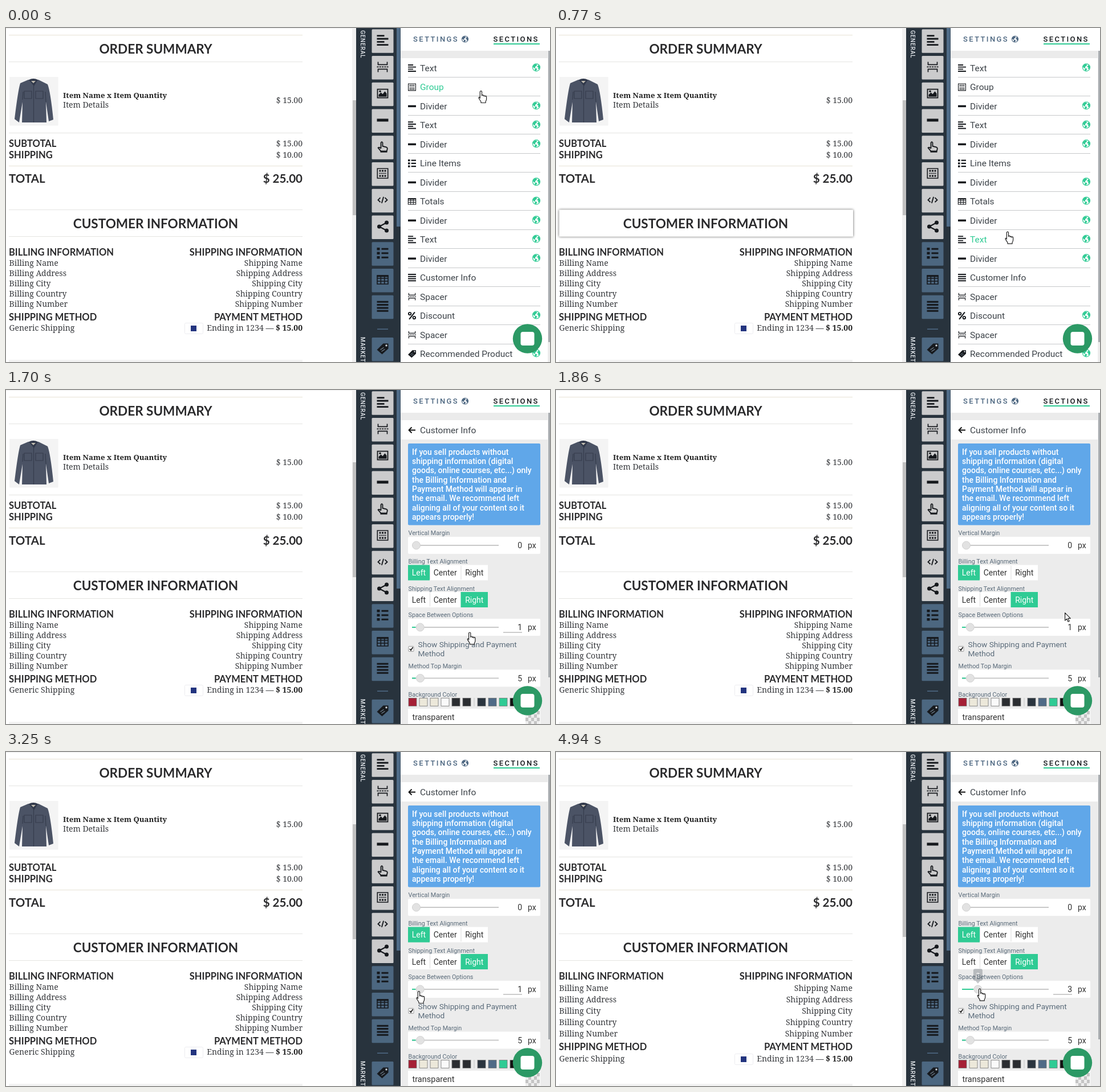
An HTML page that plays this animation: 954 px wide and 587 px high, repeating every 5030 ms.

```html
<!DOCTYPE html>
<html lang="en">
<head>
<meta charset="utf-8">
<title>Receipt editor</title>
<style>
html, body { margin: 0; width: 100%; height: 100%; overflow: hidden; background: #fff; }
svg { display: block; }
text { white-space: pre; }
.ui { font-family: Roboto, sans-serif; }
.head { font-family: Lato, sans-serif; font-weight: 700; fill: #2a2a2c; }
.body { font-family: "Noto Serif", serif; font-size: 14px; fill: #35373b; }
.bold { font-weight: 700; fill: #222; }
#hover { filter: drop-shadow(0 0 2px #555); }
</style>
</head>
<body>
<svg id="stage" width="954" height="587" viewBox="0 0 954 587"></svg>
<script>
const LOOP = 5030, STEP = LOOP / 65;
const GREEN = '#2fcb94', SLATE = '#4c6680', NAVY = '#28333d', INK = '#16191d';

const rect = (x, y, w, h, fill, extra = '') =>
  `<rect x="${x}" y="${y}" width="${w}" height="${h}" fill="${fill}" ${extra}/>`;
const text = (x, y, str, cls, extra = '') =>
  `<text x="${x}" y="${y}" class="${cls}" ${extra}>${str}</text>`;
const ui = (x, y, str, size, fill, extra = '') =>
  text(x, y, str, 'ui', `font-size="${size}" fill="${fill}" ${extra}`);
const path = (d, fill = 'currentColor', extra = '') => `<path d="${d}" fill="${fill}" ${extra}/>`;
const line = (d, width) => path(d, 'none', `stroke="currentColor" stroke-width="${width}"`);
const END = 'text-anchor="end"', MID = 'text-anchor="middle"';

// Icons live in a 20 by 20 box around the origin.
const icons = {
  text: line('M-10-8H3M-10-2.7H10M-10 2.7H3M-10 8H10', 2.8),
  spacer: line('M-8-9V-4H8V-9M-8 9V4H8V9', 1.7) + line('M-10 0H10', 1.7).replace('/>', ' stroke-dasharray="3 1.3"/>'),
  image: line('M-9-7.5H9V7.5H-9Z', 1.8) + path('M-7 5.5V2l4-4 3 3 4-5 3 4v5.5z') + '<circle cx="-4.5" cy="-4" r="1.8" fill="currentColor"/>',
  divider: path('M-10-2.5H10V2.5H-10Z'),
  button: line('M-3 3V-7q1.5-3 3 0V-1L7 1Q9 2 8 5L7 8H-3L-8 2Q-7 0-3 3', 1.8) + path('M-4 7H8V10H-4Z'),
  group: line('M-9.2-8.5H9.2V8.5H-9.2Z', 1.6) + line('M-6-4.5H6M-6 4.5H6', 3).replace('/>', ' stroke-dasharray="3 1.5"/>') + line('M-6 0H6', 2).replace('/>', ' stroke-dasharray="1.6 1"/>'),
  code: line('M-4-4L-8 0-4 4M4-4L8 0 4 4M1.6-5.5L-1.6 5.5', 1.9),
  share: line('M7-7L-6 0 7 7', 2.2) + [[7, -7], [-6, 0], [7, 7]].map(([x, y]) => `<circle cx="${x}" cy="${y}" r="3.5" fill="currentColor"/>`).join(''),
  items: line('M-10-7.5H-5M-10 0H-5M-10 7.5H-5', 4.5) + line('M-2-7.5H10M-2 0H10M-2 7.5H10', 3),
  totals: line('M-9.5-7.5H9.5V7.5H-9.5ZM-9.5-2.5H9.5M-9.5 2.5H9.5M-3.2-7.5V7.5M3.2-7.5V7.5', 1.6) + path('M-10-8H10V-5H-10Z'),
  info: line('M-10-8H10M-10-2.7H10M-10 2.7H10M-10 8H10', 3),
  discount: line('M7-9L-7 9', 3) + '<g fill="none" stroke="currentColor" stroke-width="2.8"><circle cx="-5.5" cy="-5" r="3.2"/><circle cx="5.5" cy="5" r="3.2"/></g>',
  product: path('M-10 2L1-9H10V0L-1 10Z') + '<circle cx="6.5" cy="-5.5" r="1.7" fill="#cdd3d8"/>' + path('M-4 2L2-2M-2 5L4 1', 'none', 'stroke="#71808d" stroke-width="1.4"'),
  globe: line('M-9 0A9 9 0 1 0 9 0A9 9 0 1 0-9 0', 1.7) + path('M-8-4L-3-8 2-7 0-3-3-2-2 1-5 2-8-1ZM-3 2L2 3 1 6-2 9-4 6ZM3-4L6-6 9-1 7 5 4 3 5 0 2-1Z'),
};
const icon = (name, x, y, scale = 1, color = INK) =>
  `<g transform="translate(${x} ${y}) scale(${scale})" color="${color}">${icons[name]}</g>`;

const rows = [
  ['text', 'Text', 1], ['group', 'Group', 0], ['divider', 'Divider', 1], ['text', 'Text', 1],
  ['divider', 'Divider', 1], ['items', 'Line Items', 0], ['divider', 'Divider', 1], ['totals', 'Totals', 1],
  ['divider', 'Divider', 1], ['text', 'Text', 1], ['divider', 'Divider', 1], ['info', 'Customer Info', 0],
  ['spacer', 'Spacer', 0], ['discount', 'Discount', 1], ['spacer', 'Spacer', 0], ['product', 'Recommended Product', 1],
];
const ROW = 33.47, ROW_TOP = 53;
// Receipt area lit by each row: top and height.
const areas = { 2: [11.5, 1], 3: [12, 47], 4: [59, 1], 5: [60, 124], 6: [184, 1], 7: [194, 100], 8: [319, 1], 9: [319.5, 47], 10: [366, 1], 11: [383.5, 157] };

function shirt() {
  return rect(6, 86, 85.5, 85.5, '#f4f4f4') +
    path('M39 91L25 97Q21 110 15 160L23 166 29 130 28 166H71L70 130 75 164 83 161Q78 112 73 99L57 91Z', '#4b5365') +
    path('M29 126L30 112M70 130L69 112M48.5 101V166M32 111H45V124H32ZM52 111H65V124H52Z', 'none', 'stroke="#363d4d" stroke-width="1.2"') +
    path('M40 91Q48 87 56 91L49 102Z', '#30384a') + path('M44 93H52L48 97Z', '#c2bdb0');
}

function receipt() {
  const rules = [12, 59, 184, 242, 319, 366].map((y, i) => rect(5, y, 515, 1, i === 0 || i === 3 ? '#e7e2d5' : '#e4e4e2')).join('');
  const head = (x, y, s, size, extra = '') => text(x, y, s, 'head', `font-size="${size}" ${extra}`);
  const right = (y, s) => text(520, y, s, 'body', END);
  const fields = ['Name', 'Address', 'City', 'Country', 'Number'].map((f, k) =>
    `<g data-rank="${k + 1}">${text(5.5, 417.5 + 18 * k, 'Billing ' + f, 'body')}${right(417.5 + 18 * k, 'Shipping ' + f)}</g>`).join('');
  return rect(0, 0, 607, 1, '#efefef') + '<rect id="hover" x="5.5" width="515.5" fill="#fff"/>' + rules +
    rect(5, 583, 515, 4, '#f3f3f3') +
    head(262.5, 45, 'ORDER SUMMARY', 22.5, MID) + shirt() +
    text(100, 123, 'Item Name x Item Quantity', 'body bold', 'style="font-size:13.2px"') +
    text(100, 140, 'Item Details', 'body') + right(131.5, '$ 15.00') +
    head(5, 209, 'SUBTOTAL', 16.5) + right(208, '$ 15.00') +
    head(5, 228.7, 'SHIPPING', 16.5) + right(227.5, '$ 10.00') +
    head(5, 271.7, 'TOTAL', 20.5) + head(520, 271.7, '$ 25.00', 20.5, END) +
    head(262.5, 352, 'CUSTOMER INFORMATION', 22.5, MID) +
    head(5, 399.5, 'BILLING INFORMATION', 16.5) + head(520, 399.5, 'SHIPPING INFORMATION', 16.5, END) + fields +
    `<g data-rank="5">${head(5, 513.7, 'SHIPPING METHOD', 16.5)}${head(520, 513.7, 'PAYMENT METHOD', 16.5, END)}</g>` +
    `<g data-rank="6">${text(5.5, 532, 'Generic Shipping', 'body')}` +
    rect(313.5, 518.5, 32, 19, '#fff', 'rx="2" stroke="#ececf0"') + rect(324, 523, 10, 10, '#23347f') +
    `<text x="520" y="532" class="body" ${END}>Ending in 1234 — <tspan class="bold">$ 15.00</tspan></text></g>` +
    rect(607, 0, 7.5, 587, '#f1f1f1') + '<rect id="pageThumb" x="608" y="127" width="6" fill="#c1c1c1"/>';
}

function toolbar() {
  const tools = ['text', 'spacer', 'image', 'divider', 'button', 'group', 'code', 'share', 'items', 'totals', 'info'];
  const button = (name, y, blue) => rect(641.5, y - 20.5, 38, 41.5, blue ? '#4c6780' : '#cbcbcc', 'rx="1.5"') + icon(name, 660.5, y - 1);
  const label = (y, s) => ui(0, 0, s, 10, '#e6eaee', `font-weight="500" letter-spacing=".8" transform="translate(622 ${y}) rotate(90)"`);
  return rect(614, 0, 78, 587, NAVY) + rect(685, 0, 6.5, 349, '#506c88') +
    label(4, 'GENERAL') + label(543, 'MARKETING') +
    tools.map((n, i) => button(n, 22.7 + 46.75 * i, i > 7)).join('') +
    rect(651, 528.5, 19, 1.5, '#506c88') + button('product', 564.5, true);
}

function sectionList() {
  return rect(692, 53, 258, 534, '#fff') + rows.map(([name, label, globe], i) => {
    const y = 70 + ROW * i;
    return icon(name, 712, y + .5, .7) + ui(726, y + 6, label, 15.5, '#3c4248', 'data-row') +
      (globe ? icon('globe', 930, y - .7, .72, GREEN) : '') + rect(705, Math.round(y + 16), 232, 1, '#c6c8ca');
  }).join('');
}

function slider(y, label, value, x, id = '') {
  const tag = s => id ? `id="${id}${s}"` : '';
  return ui(705.5, y - 18, label, 10.8, '#596a79') + rect(705, y - 15, 232, 30, '#fff', 'rx="2"') +
    rect(712, y - 1, 152, 2, '#c9c9c9') + rect(712, y - 1, Math.max(0, x - 720), 2, GREEN, tag('Fill')) +
    `<circle ${tag('Knob')} cx="${x}" cy="${y}" r="7" fill="#e2e2e2" stroke="#d2d2d2"/>` +
    ui(905, y + 5, value, 14, '#333', `${END} ${tag('Value')}`) + ui(915, y + 5, 'px', 14, '#333');
}

function alignment(y, label, active) {
  const cells = [['Left', 705, 38], ['Center', 743, 54.5], ['Right', 797.5, 47.5]];
  return ui(705.5, y - 16, label, 10.8, '#596a79') + cells.map(([s, x, w], i) => {
    const on = s === active;
    return rect(x, y - 13.5, w, 27, on ? GREEN : '#fff') + (i && !on ? rect(x, y - 12, 1, 24, '#ddd') : '') +
      ui(x + w / 2, y + 5, s, 14, on ? '#fff' : '#333', MID);
  }).join('');
}

function editor() {
  const note = ['If you sell products without', 'shipping information (digital', 'goods, online courses, etc...) only', 'the Billing Information and',
    'Payment Method will appear in', 'the email. We recommend left', 'aligning all of your content so it', 'appears properly!'];
  const swatches = ['#a51f35', '#ece8da', '#ece8da', '#fafafa', '#2b2d31', '#2b2d31', '#2a343e', '#4f6a86', GREEN, '#111'];
  let checker = '';
  for (let i = 0; i < 20; i++) checker += rect(911 + (i % 5) * 5, 564 + Math.floor(i / 5) * 6, 5, 6, (i + Math.floor(i / 5) * 0) % 2 ? '#eee' : '#c4c4c4');
  return rect(692, 53, 258, 534, '#ececec') + rect(692, 53, 258, 34, '#fff') +
    path('M718 70.5H707M711.5 65.5L706.5 70.5 711.5 75.5', 'none', 'stroke="#111" stroke-width="1.8"') +
    ui(726, 76, 'Customer Info', 15.5, '#3c4248') + rect(705, 94, 232, 143.5, '#60a7e9', 'rx="2"') +
    note.map((s, i) => ui(712, 113.5 + 16.35 * i, s, 14, '#fff', 'font-weight="500"')).join('') +
    slider(273, 'Vertical Margin', 0, 719.5) +
    alignment(321, 'Billing Text Alignment', 'Left') + alignment(368.5, 'Shipping Text Alignment', 'Right') +
    slider(417, 'Space Between Options', 1, 726.3, 'gap') + rect(872, 425.5, 33, 1, '#999', 'id="underline"') +
    rect(706, 450.5, 9, 9, '#fff', 'stroke="#999" rx="1"') + path('M708 455L710 457.5 713.5 452', 'none', 'stroke="#222" stroke-width="1.8"') +
    ui(722.5, 452, 'Show Shipping and Payment', 13.7, '#596a79') + ui(722.5, 468, 'Method', 13.7, '#596a79') +
    slider(506.5, 'Method Top Margin', 5, 726.5) + ui(705.5, 538.5, 'Background Color', 10.8, '#596a79') +
    swatches.map((c, i) => rect(706 + 19 * i + (i > 5 ? 7 : 0), 541.5, 14, 14, c, 'stroke="#777" stroke-width=".8"')).join('') +
    rect(820.5, 541, 1, 15, '#c4c4c4') + rect(705, 560, 232, 27, '#fff') + ui(712.5, 580, 'transparent', 14.5, '#333') + checker +
    `<g id="tip">${rect(-8, 381, 16, 21, NAVY, 'rx="3"')}${path('M-5 401H5L0 407Z', NAVY)}` +
    ui(0, 396, 1, 11, '#fff', `font-weight="700" id="tipValue" ${MID}`) + '</g>';
}

function panel() {
  const tab = (x, s, fill) => ui(x, 24, s, 13, fill, 'font-weight="500" letter-spacing="2.4"');
  return rect(692, 0, 262, 587, '#fff') + rect(692, 40, 262, 13, '#ebebeb') + rect(950, 40, 4, 547, '#ececec') +
    tab(714, 'SETTINGS', SLATE) + icon('globe', 805, 19.5, .62, SLATE) + tab(854.5, 'SECTIONS', INK) + rect(855, 27, 81, 2, GREEN) +
    `<g id="list">${sectionList()}</g><g id="editor">${editor()}</g>` +
    '<rect id="panelThumb" x="951" y="40" width="3" fill="#a9adb1"/>' +
    '<circle cx="914.5" cy="546" r="25.7" fill="#2c9965"/>' + rect(902.5, 534, 24, 24, '#fff', 'rx="4"');
}

const outline = 'stroke="#222" stroke-width="1.2" stroke-linejoin="round"';
const cursors =
  path('M-1.7 12.5V1.2a1.6 1.6 0 0 1 3.2 0V8a1.4 1.4 0 0 1 2.8 0v.8a1.4 1.4 0 0 1 2.7 0v.8a1.3 1.3 0 0 1 2.6 0V14q0 2.5-1.5 4v2.5H0v-2L-3.6 13q-1-2 .4-2.3 1-.1 1.5 1.8z', '#fff', outline + ' id="hand"') +
  path('M0 0V13.5L3.2 10.6 5.4 15.6 7.6 14.6 5.4 9.8H9.6Z', '#fff', outline + ' id="arrow"');

const stage = document.getElementById('stage');
stage.innerHTML = receipt() + toolbar() + panel() + `<g id="cursor">${cursors}</g>`;

const $ = id => document.getElementById(id);
const set = (id, attrs) => { for (const k in attrs) $(id).setAttribute(k, attrs[k]); };
const show = (id, on) => set(id, { visibility: on ? 'visible' : 'hidden' });
const rowLabels = [...stage.querySelectorAll('[data-row]')];
const spaced = [...stage.querySelectorAll('[data-rank]')];

// Pointer tip: time, x, y.
const route = [
  [0, 833, 111], [80, 832, 118], [310, 814, 220], [540, 800, 305], [770, 792, 358], [1080, 796, 405], [1310, 795, 424],
  [1550, 797, 431], [1700, 812, 427], [1860, 894, 391], [2100, 897, 392], [2255, 897, 392], [2560, 762, 440], [2700, 712, 458],
  [2790, 722, 461], [3000, 724, 446], [3250, 724, 421], [3480, 724, 421], [3790, 732, 421], [3940, 733, 420], [4250, 736, 419],
  [4400, 737, 418], [4640, 741, 418], [4710, 741, 418], [4940, 744, 416], [LOOP, 744, 416],
];
function pointer(t) {
  const i = Math.max(1, route.findIndex(p => p[0] >= t));
  const [t0, x0, y0] = route[i - 1], [t1, x1, y1] = route[i];
  const k = (t - t0) / (t1 - t0);
  return [x0 + (x1 - x0) * k, y0 + (y1 - y0) * k];
}

function draw(time) {
  const t = Math.floor((time + 6) / STEP) * STEP % LOOP;
  const [x, y] = pointer(t);
  const editing = t > 1690;
  const row = editing ? -1 : Math.floor((y - ROW_TOP) / ROW);
  const area = t < 1620 && areas[row];
  const value = t < 3700 ? 1 : t < 4315 ? 2 : 3;
  const gap = t < 3930 ? 1 : value;
  const knob = 719.5 + 6.8 * value;

  rowLabels.forEach((el, i) => el.setAttribute('fill', i === row ? GREEN : '#3c4248'));
  show('hover', area);
  if (area) set('hover', { y: area[0], height: area[1] });
  spaced.forEach(el => el.setAttribute('transform', `translate(0 ${el.dataset.rank * (gap - 1)})`));
  set('pageThumb', { height: 204 - gap * 2 });
  set('panelThumb', { height: t < 1620 ? 512 : 465 });

  set('list', { display: editing ? 'none' : 'inline' });
  set('editor', { display: editing ? 'inline' : 'none' });
  set('gapFill', { width: knob - 720 });
  set('gapKnob', { cx: knob });
  $('gapValue').textContent = $('tipValue').textContent = value;
  set('underline', { opacity: editing && y > 402 && y < 432 ? 1 : 0 });
  set('tip', {
    transform: `translate(${knob} 0)`,
    opacity: t < 3550 ? 0 : Math.max(0, Math.min(1, (4930 - t) / 210)),
  });

  const pointing = !editing || (x < 866 && y > 402);
  show('hand', pointing);
  show('arrow', !pointing);
  set('cursor', { transform: `translate(${x.toFixed(1)} ${y.toFixed(1)})` });
}

const start = performance.now();
function tick() {
  draw((performance.now() - start) % LOOP);
  requestAnimationFrame(tick);
}
tick();
</script>
</body>
</html>
```
